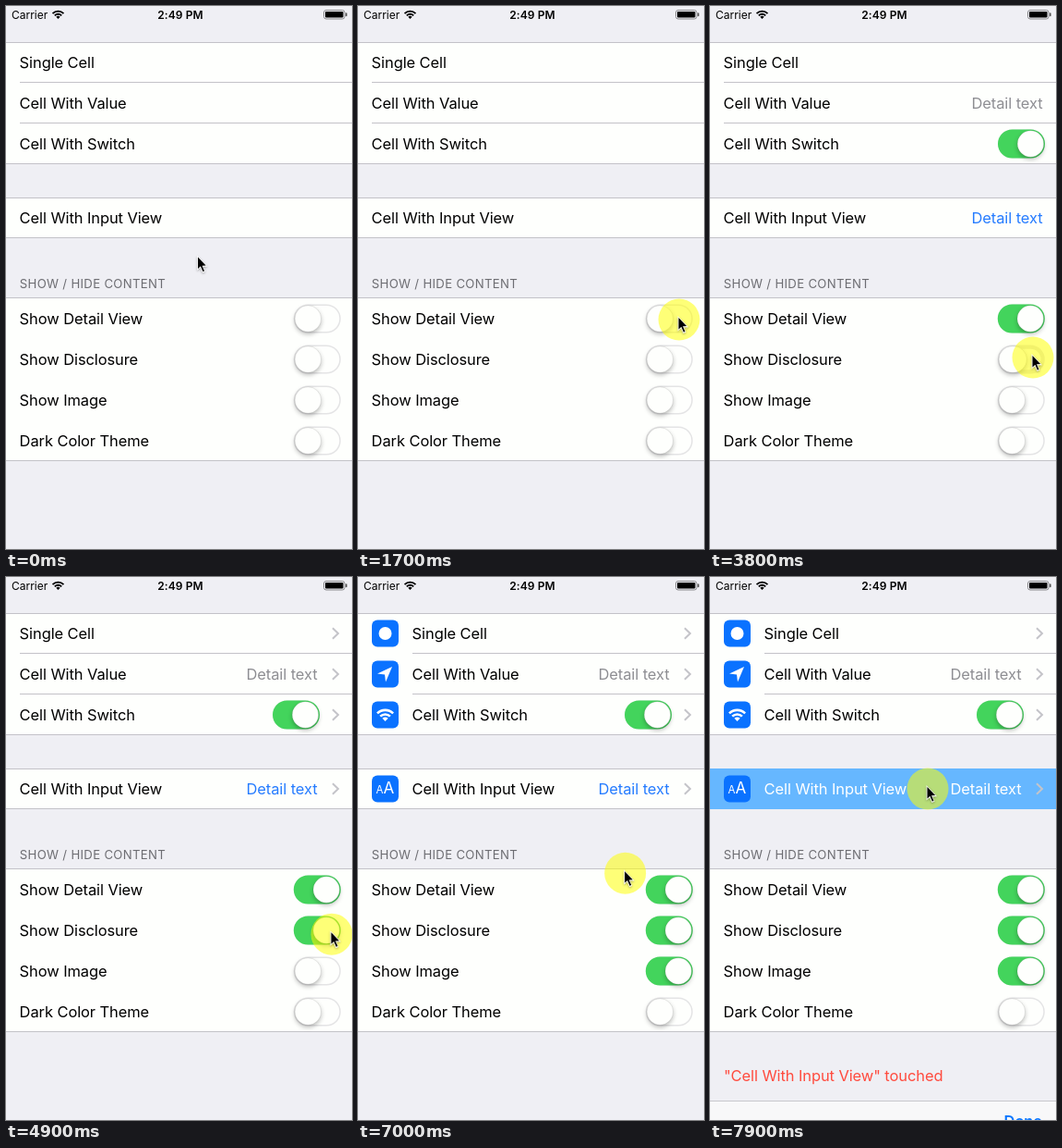
Animation of 375x587 px, one loop 8000 ms. Source, as an HTML page with a canvas:

```html
<!DOCTYPE html>
<html lang="en">
<head>
<meta charset="utf-8">
<title>Settings list</title>
<style>
html, body { margin: 0; width: 100%; height: 100%; overflow: hidden; background: #efeff4; }
canvas { display: block; width: 375px; height: 587px; }
</style>
</head>
<body>
<canvas id="stage"></canvas>
<script>
const W = 375, H = 587, LOOP = 8000, STEP = 100;
const FONT = 'Inter, Roboto, sans-serif';
const LINE = '#c3c2c8', GREEN = '#43d45c', BLUE = '#0a76ff', INK = '#000', PAPER = '#fefffd';
const canvas = document.getElementById('stage');
const dpr = window.devicePixelRatio || 1;
canvas.width = W * dpr;
canvas.height = H * dpr;
const c = canvas.getContext('2d');

// Pointer moves: start, end, from, to, bow of the path
const MOVES = [
  [1000, 1700, 208.5, 273.5, 348, 339, 0, -8],
  [3000, 3500, 348, 339, 350, 380, 11, 5],
  [4800, 5400, 350, 380, 351, 424.5, 6, -5],
  [6700, 7400, 351, 424.5, 236, 229, 0, 0]
];
const PRESS = { detail: 2000, disclosure: 3800, image: 5800 };
const TOUCH = 7700;

const clamp = v => Math.max(0, Math.min(1, v));
const span = (t, a, b) => clamp((t - a) / (b - a));
const glide = p => p + p * p - p * p * p;
const smooth = p => p * p * (3 - 2 * p);
const mix = (a, b, p) => a + (b - a) * p;

function rect(x, y, w, h, fill) {
  c.fillStyle = fill;
  c.fillRect(x, y, w, h);
}

function round(x, y, w, h, r, fill) {
  c.beginPath();
  c.roundRect(x, y, w, h, r);
  c.fillStyle = fill;
  c.fill();
}

function disc(x, y, r, fill) {
  c.beginPath();
  c.arc(x, y, r, 0, Math.PI * 2);
  c.fillStyle = fill;
  c.fill();
}

function poly(points, fill) {
  c.beginPath();
  points.forEach(([x, y]) => c.lineTo(x, y));
  c.closePath();
  c.fillStyle = fill;
  c.fill();
}

function text(str, x, y, { size = 16.5, color = INK, weight = 400, align = 'left', gap = -0.1 } = {}) {
  c.font = `${weight} ${size}px ${FONT}`;
  c.letterSpacing = gap + 'px';
  c.textAlign = align;
  c.fillStyle = color;
  c.fillText(str, x, y);
}

function wifi(x, y, size, color) {
  const a = Math.PI * 0.25;
  c.strokeStyle = color;
  c.lineWidth = size * 0.19;
  for (const r of [0.9, 0.56]) {
    c.beginPath();
    c.arc(x, y, size * r, -Math.PI / 2 - a, -Math.PI / 2 + a);
    c.stroke();
  }
  c.beginPath();
  c.moveTo(x, y);
  c.arc(x, y, size * 0.33, -Math.PI / 2 - a, -Math.PI / 2 + a);
  c.fillStyle = color;
  c.fill();
}

function statusBar() {
  text('Carrier', 6, 13.5, { size: 12, gap: 0 });
  wifi(56.5, 14, 9.4, INK);
  text('2:49 PM', 189, 13.5, { size: 12, weight: 600, align: 'center', gap: 0.1 });
  c.beginPath();
  c.roundRect(344.5, 4.5, 22.5, 9.5, 2.5);
  c.strokeStyle = '#8a8a8d';
  c.lineWidth = 1;
  c.stroke();
  round(346, 6, 19.5, 6.5, 1, INK);
  round(368, 7.3, 1.6, 4, 0.8, '#555');
}

function group(top, bottom) {
  rect(0, top, W, bottom - top + 1, PAPER);
  rect(0, top, W, 1, LINE);
  rect(0, bottom, W, 1, LINE);
}

function toggle(x, cy, on, press) {
  const y = cy - 15.5;
  round(x, y, 51, 31, 15.5, '#e4e4e5');
  const inset = 1.5 + 14 * smooth(press);
  if (on < 1 && inset < 15) {
    round(x + inset, y + inset, 51 - 2 * inset, 31 - 2 * inset, 15.5 - inset, PAPER);
  }
  if (on > 0) {
    c.globalAlpha = on;
    round(x, y, 51, 31, 15.5, GREEN);
    c.globalAlpha = 1;
  }
  const w = 28.5 + 6 * press * (1 - on);
  const left = mix(x + 1.3, x + 49.7 - w, on);
  c.save();
  c.shadowColor = 'rgba(0,0,0,.27)';
  c.shadowBlur = 5 * dpr;
  c.shadowOffsetY = 2.5 * dpr;
  round(left, cy - 14.25, w, 28.5, 14.25, PAPER);
  c.restore();
  c.beginPath();
  c.roundRect(left, cy - 14.25, w, 28.5, 14.25);
  c.strokeStyle = 'rgba(0,0,0,.13)';
  c.lineWidth = 0.7;
  c.stroke();
}

function chevron(cy) {
  c.beginPath();
  c.moveTo(354, cy - 5.8);
  c.lineTo(360, cy);
  c.lineTo(354, cy + 5.8);
  c.strokeStyle = '#c4c4c9';
  c.lineWidth = 2;
  c.stroke();
}

const ICONS = [
  cy => disc(29.5, cy, 7, '#fff'),
  cy => poly([[37, cy - 8], [21, cy - 0.5], [29, cy + 0.5], [30, cy + 8.5]], '#fff'),
  cy => wifi(29.5, cy + 7, 13.5, '#fff'),
  cy => {
    text('A', 19.5, cy + 5, { size: 11.5, color: '#fff', gap: 0 });
    text('A', 27.5, cy + 5, { size: 17, color: '#fff', gap: 0 });
  }
];
const CELLS = [
  ['Single Cell', 61],
  ['Cell With Value', 105],
  ['Cell With Switch', 149],
  ['Cell With Input View', 229]
];
const OPTIONS = [
  ['Show Detail View', 'detail'],
  ['Show Disclosure', 'disclosure'],
  ['Show Image', 'image'],
  ['Dark Color Theme', '']
];

function list(t) {
  const shown = key => t >= PRESS[key] + STEP;
  const image = shown('image'), arrow = shown('disclosure'), detail = shown('detail');
  const left = image ? 59 : 15, right = arrow ? 337.5 : 360.5;
  const lit = t >= TOUCH;

  group(39, 170);
  rect(left, 82, W - left, 1, LINE);
  rect(left, 126, W - left, 1, LINE);
  group(207, 250);
  if (lit) rect(0, 207, W, 44, '#66b7ff');

  CELLS.forEach(([label, cy], i) => {
    const white = lit && i === 3;
    if (image) {
      round(15, cy - 14.5, 29, 29, 6, '#0a72ff');
      ICONS[i](cy);
    }
    text(label, left - 0.4, cy + 6, { color: white ? '#fff' : INK });
    if (arrow) chevron(cy);
    if (!detail) return;
    if (i === 2) toggle(arrow ? 289 : 312, cy, 1, 0);
    if (i === 1 || i === 3) {
      const color = white ? '#fff' : i === 3 ? '#267cff' : '#8e8e93';
      text('Detail text', right, cy + 6, { color, align: 'right' });
    }
  });

  text('SHOW / HIDE CONTENT', 14.8, 304.5, { size: 13.2, color: '#6d6d72', gap: 0.3 });
  group(315, 491);
  OPTIONS.forEach(([label, key], i) => {
    const cy = 338 + 44 * i, at = PRESS[key];
    text(label, 14.6, cy + 6);
    const on = at ? smooth(span(t, at + 50, at + 320)) : 0;
    const press = at ? span(t, at - 40, at + 100) : 0;
    toggle(311.8, cy, on, press);
  });
}

function touched(t) {
  if (t < TOUCH + STEP) return;
  text('"Cell With Input View" touched', 15, 545, { color: '#ff4b3e' });
  const y = mix(H, 566, smooth(span(t, TOUCH + STEP, TOUCH + 2 * STEP)));
  rect(0, y, W, H - y, '#f8f8f9');
  rect(0, y, W, 1, '#c8c8cd');
  text('Done', 360, y + 28, { weight: 600, color: BLUE, align: 'right' });
}

function pointer(t) {
  let [, , x, y] = MOVES[0];
  for (const [a, b, x0, y0, x1, y1, bowX, bowY] of MOVES) {
    if (t < a) break;
    const p = glide(span(t, a, b));
    const bend = 3 * p * (1 - p);
    x = mix(x0, x1, p) + bowX * bend;
    y = mix(y0, y1, p) + bowY * bend;
  }
  disc(x, y, 22.5, `rgba(255,255,0,${0.53 * span(t, 0, 500)})`);
  c.save();
  c.translate(x - 0.5, y - 2);
  c.shadowColor = 'rgba(0,0,0,.35)';
  c.shadowBlur = 2.5 * dpr;
  c.shadowOffsetY = dpr;
  poly([[-1, -2], [-1, 14.6], [2.6, 11.4], [5, 17], [8, 15.8], [5.7, 10.4], [10.6, 10.2]], 'rgba(255,255,255,.85)');
  c.shadowColor = 'transparent';
  poly([[0, 0], [0, 12.4], [2.9, 9.8], [5.4, 15.6], [7, 14.9], [4.5, 9.3], [8.6, 9.1]], INK);
  c.restore();
}

function draw(now) {
  const t = Math.floor((now % LOOP) / STEP) * STEP;
  c.setTransform(dpr, 0, 0, dpr, 0, 0);
  rect(0, 0, W, H, '#efeff4');
  statusBar();
  list(t);
  touched(t);
  pointer(t);
}

let start;
function tick(now) {
  start ??= now;
  draw(now - start);
  requestAnimationFrame(tick);
}
requestAnimationFrame(tick);
</script>
</body>
</html>
```
